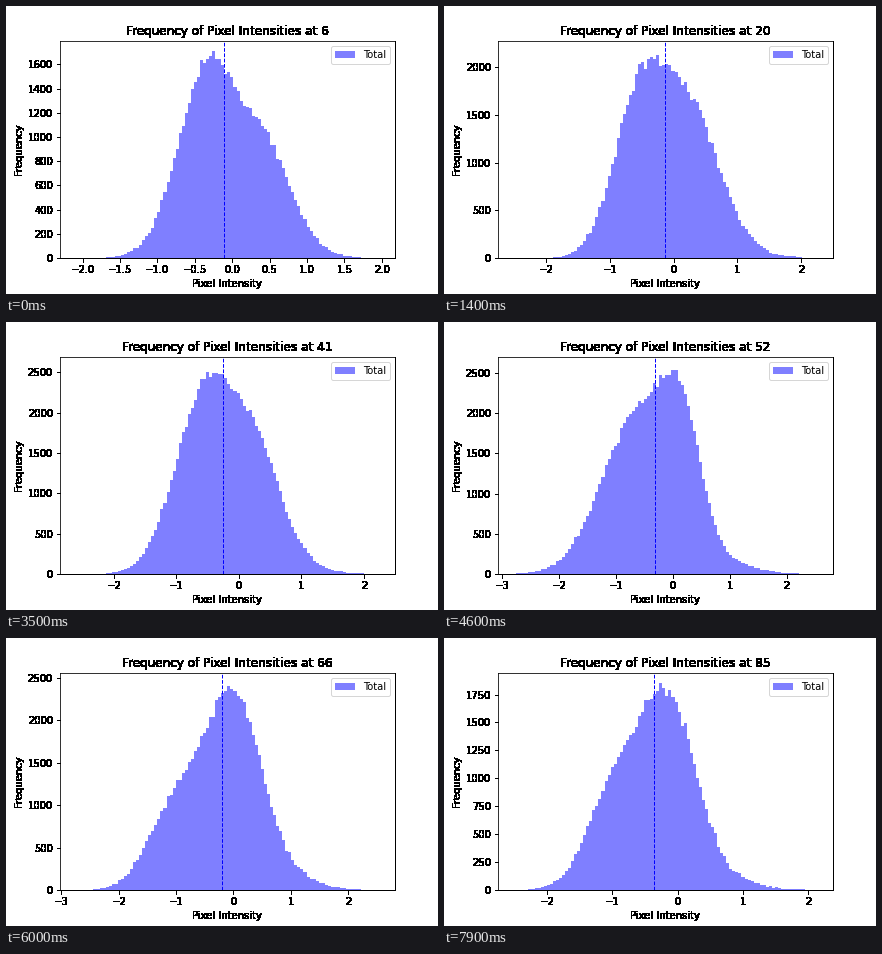
Animation, 432 px wide and 288 px high, one loop 8000 ms. Source, as a matplotlib script:

```python
import numpy as np
import matplotlib.pyplot as plt
from matplotlib.animation import FuncAnimation

FRAMES, INTERVAL, FIRST = 80, 100, 6
BINS = 100
WIDTHS = 18  # both bells together, in bins

# Key points, eased linearly in between.
STEPS = [6, 20, 29, 41, 52, 66, 85]
LOW = [-2.10, -2.52, -2.57, -2.62, -2.80, -2.76, -2.52]
HIGH = [1.97, 2.26, 2.10, 2.25, 2.54, 2.55, 2.14]
PEAK = [1712, 2174, 2227, 2569, 2576, 2443, 1854]
# The outline is a left and a right bell, placed in bins.
LEFT = [44, 42, 43, 43, 41.3, 32.5, 33.8]
RIGHT = [63.3, 58.7, 60.7, 59.7, 55.5, 51.8, 51.2]
LEFT_WIDTH = [9.8, 8.7, 9.8, 9.8, 11.8, 8.6, 9]
RIGHT_SHARE = [0.31, 0.44, 0.48, 0.35, 0.4, 0.71, 0.64]


def bell(x, centre, width):
    return np.exp(-((x - centre) / width) ** 2 / 2)


def histogram(step):
    """Bin edges, counts and tallest bin for one step."""
    low, high, peak, left, right, width, share = (
        np.interp(step, STEPS, key) for key in
        (LOW, HIGH, PEAK, LEFT, RIGHT, LEFT_WIDTH, RIGHT_SHARE))
    x = np.arange(BINS) + 0.5
    counts = (1 - share) * bell(x, left, width)
    counts += share * bell(x, right, WIDTHS - width)
    counts += 0.035 * bell(x, 70, 10)  # long right tail
    counts *= 0.97 * peak / counts.max()
    noise = np.random.default_rng(step).normal(0, 0.7, BINS)
    counts = np.clip(counts + noise * np.sqrt(counts), 0, peak)
    return np.linspace(low, high, BINS + 1), counts, peak


def median(edges, counts):
    total = np.concatenate([[0], np.cumsum(counts)])
    return np.interp(total[-1] / 2, total, edges)


def solid(image, dpi):
    """Turn every touched pixel fully black."""
    image = image.copy()
    image[..., :3] = 0
    image[..., 3] = image[..., 3] > 0
    return image, 0, 0


fig, ax = plt.subplots(figsize=(6, 4), dpi=72, facecolor="white")
fig.subplots_adjust(left=0.125, right=0.9, bottom=0.125, top=0.88)
ax.set_xlabel("Pixel Intensity")
ax.set_ylabel("Frequency")
bars = ax.stairs(np.ones(BINS), np.linspace(-2, 2, BINS + 1), fill=True,
                 color="blue", alpha=0.5, label="Total")
middle = ax.axvline(0, color="blue", linestyle="--", linewidth=1)
ax.legend(loc="upper right")
for part in (ax.title, ax.xaxis, ax.yaxis,
             ax.spines["right"], ax.spines["bottom"]):
    part.set_agg_filter(solid)


def update(i):
    step = FIRST + i
    edges, counts, peak = histogram(step)
    bars.set_data(counts, edges)
    middle.set_xdata([median(edges, counts)] * 2)
    pad = 0.05 * (edges[-1] - edges[0])
    ax.set_xlim(edges[0] - pad, edges[-1] + pad)
    ax.set_ylim(0, 1.05 * peak)
    ax.set_title(f"Frequency of Pixel Intensities at {step}")
    return bars, middle


anim = FuncAnimation(fig, update, frames=FRAMES, interval=INTERVAL,
                     repeat=True, repeat_delay=0, blit=False)
plt.show()
```
